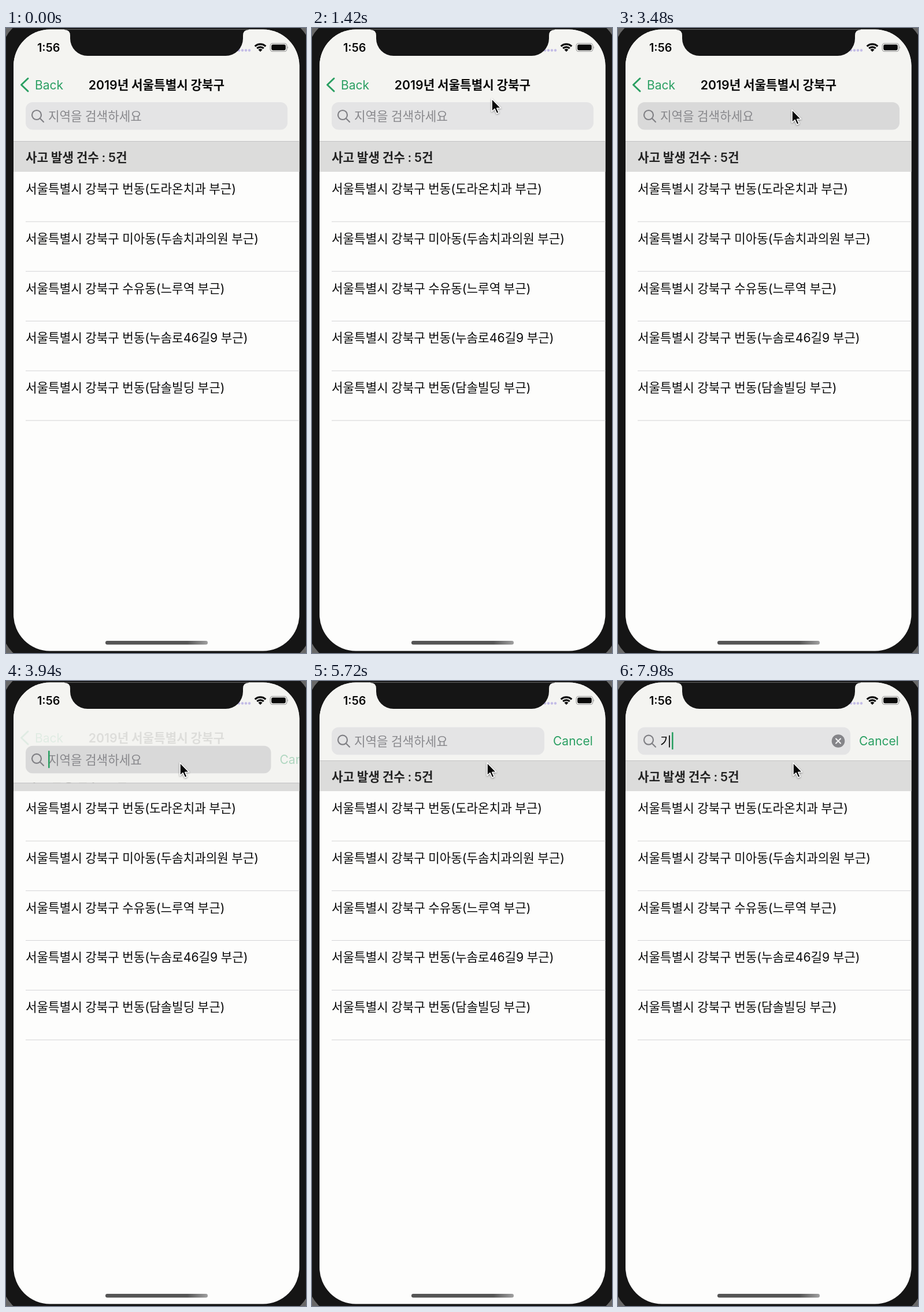
Animation of 519 by 1078 pixels, one loop 8 s. Source, as an HTML page:

```html
<!DOCTYPE html>
<html lang="ko">
<head>
<meta charset="utf-8">
<style>
  html, body { margin: 0; width: 100%; height: 100%; overflow: hidden; background: #686868; }
  svg { display: block; width: 100%; height: 100%; }
  text { font: 21.25px Inter, "Noto Sans CJK KR", sans-serif; word-spacing: -.6px; fill: #0a0a0a; white-space: pre; }
  .bold { font-weight: 600; }
  .green { fill: #2a9f62; font-size: 21px; }
</style>
</head>
<body>
<svg viewBox="0 0 519 1078">
  <defs>
    <clipPath id="screen"><rect x="13" y="2.5" width="494.5" height="1072" rx="63"/></clipPath>
    <linearGradient id="homeFill">
      <stop stop-color="#555"/><stop offset=".8" stop-color="#555"/><stop offset="1" stop-color="#a0a0a0"/>
    </linearGradient>
  </defs>
  <rect x="-7" y="-17" width="535" height="1111" rx="61" fill="#151515"/>

  <g clip-path="url(#screen)">
    <rect width="519" height="1078" fill="#fdfdfc"/>
    <g id="list">
      <rect y="195" width="519" height="53" fill="#dcdcdb"/>
      <text class="bold" x="34" y="230.5" style="fill:#222">사고 발생 건수 : 5건</text>
    </g>

    <rect id="nav" width="519" fill="#f4f4f1"/>
    <rect id="navLine" width="519" height="1" fill="#c3c3c3"/>
    <g id="title">
      <path d="M38 87 26.5 98 38 109" fill="none" stroke="#2a9f62" stroke-width="3" stroke-linecap="round" stroke-linejoin="round"/>
      <text class="green" x="50" y="105.5">Back</text>
      <text class="bold" x="260.5" y="106" text-anchor="middle">2019년 서울특별시 강북구</text>
    </g>

    <g id="bar">
      <rect id="field" x="34" height="47.5" rx="12"/>
      <g fill="none" stroke="#808085" stroke-width="2.2" stroke-linecap="round">
        <circle cx="53" cy="22" r="8"/><path d="M59 28l6 6"/>
      </g>
      <text id="query" x="73" y="32"></text>
      <rect id="caret" y="8.5" width="2.6" height="30" rx="1" fill="#2a9f62"/>
      <g id="clear">
        <circle cx="381" cy="23.8" r="11.3" fill="#858589"/>
        <path d="M377 19.8l8 8m0-8l-8 8" stroke="#f4f4f4" stroke-width="2" stroke-linecap="round"/>
      </g>
      <text id="cancel" class="green" y="31">Cancel</text>
    </g>

    <text class="bold" x="54" y="41" style="font-size:19.8px">1:56</text>
    <g fill="#c3bce6">
      <circle cx="403" cy="38.5" r="2.2"/><circle cx="409" cy="38.5" r="2.2"/>
      <circle cx="415" cy="38.5" r="2.2"/><circle cx="421" cy="38.5" r="2.2"/>
    </g>
    <g fill="none" stroke="#0a0a0a" stroke-width="3.2">
      <path d="M430.7 31.7a13.2 13.2 0 0 1 18.6 0M434.2 35.2a8.2 8.2 0 0 1 11.6 0"/>
      <path d="M440 41l-3.5-3.5a5 5 0 0 1 7 0z" fill="#0a0a0a" stroke="none"/>
    </g>
    <rect x="457.2" y="26.5" width="28.6" height="14" rx="4" fill="none" stroke="#999" stroke-width="1.2"/>
    <rect x="459.2" y="28.5" width="24.6" height="10" rx="2.4" fill="#0a0a0a"/>
    <path d="M487 31.2q2 2.3 0 4.6z" fill="#999"/>
    <rect x="172" y="1057" width="177" height="6.5" rx="3.2" fill="url(#homeFill)"/>
    <path d="M101 0V3Q111 3 111 13V18A30 30 0 0 0 141 48H380A30 30 0 0 0 410 18V13Q410 3 420 3V0z" fill="#151515"/>
  </g>

  <path id="cursor" d="M0 0V22L5 17.6 8.6 25.6 12.2 24 8.8 16.4 15.6 16z" fill="#080808"
    stroke="#fff" stroke-width="1.6" stroke-linejoin="round" style="filter:drop-shadow(0 1.5px 1.5px #0006)"/>
</svg>
<script>
const LOOP = 8000, OPEN = 3821, TYPE = 7000;
const el = id => document.getElementById(id);
const set = (id, attrs) => { for (const k in attrs) el(id).setAttribute(k, attrs[k]); };
const clamp = v => Math.min(1, Math.max(0, v));

const places = ['번동(도라온치과', '미아동(두솜치과의원', '수유동(느루역', '번동(누솜로46길9', '번동(담솔빌딩'];
el('list').insertAdjacentHTML('beforeend', places.map((place, i) => {
  const y = 248 + 85.75 * i;
  return `<text x="34" y="${y + 37}">서울특별시 강북구 ${place} 부근)</text>
    <rect x="34" y="${y + 85.5}" width="485" height="1" fill="#d3d3d6"/>`;
}).join(''));

// Pointer path: time, x, y
const path = [[900, 522, 640], [1400, 311, 122], [1700, 311, 122], [2300, 301, 141], [5100, 301, 141], [5300, 303, 141]];

function pointer(t) {
  let i = 0;
  while (i < path.length - 2 && t > path[i + 1][0]) i++;
  const [a, b] = [path[i], path[i + 1]];
  const u = clamp((t - a[0]) / (b[0] - a[0]));
  const e = u * u * (3 - 2 * u);
  return [a[1] + (b[1] - a[1]) * e, a[2] + (b[2] - a[2]) * e];
}

function draw(t) {
  const s = Math.max(0, t - OPEN) * 0.00995;
  const p = 1 - (1 + s) * Math.exp(-s);
  const typed = t < TYPE ? '' : t < TYPE + 250 ? 'ㄱ' : '기';
  const pressed = t >= 3360 && t < 4070;
  const navEnd = 195 - 58 * p;

  set('list', { transform: `translate(0 ${t < OPEN ? 0 : -58})` });
  set('nav', { height: navEnd });
  set('navLine', { y: navEnd });
  set('title', { opacity: clamp(1 - 2.7 * p) });
  set('bar', { transform: `translate(0 ${128 - 48.3 * p})` });
  set('field', { width: 453 - 85 * p, fill: pressed ? '#d9d9d9' : '#e4e4e5' });
  set('cancel', { x: 502 - 85 * p, opacity: p });

  el('query').textContent = typed || '지역을 검색하세요';
  el('query').style.fill = typed ? '#0a0a0a' : '#88888c';
  set('caret', {
    x: typed ? 93 : 73,
    opacity: t > OPEN + 30 && (t - OPEN - 30) % 1000 < 550 ? 1 : 0
  });
  set('clear', { opacity: typed ? 1 : 0 });
  set('cursor', { transform: `translate(${pointer(t)})`, opacity: t < 900 ? 0 : 1 });
}

const start = performance.now();
function tick() {
  draw((performance.now() - start) % LOOP);
  requestAnimationFrame(tick);
}
tick();
</script>
</body>
</html>
```
